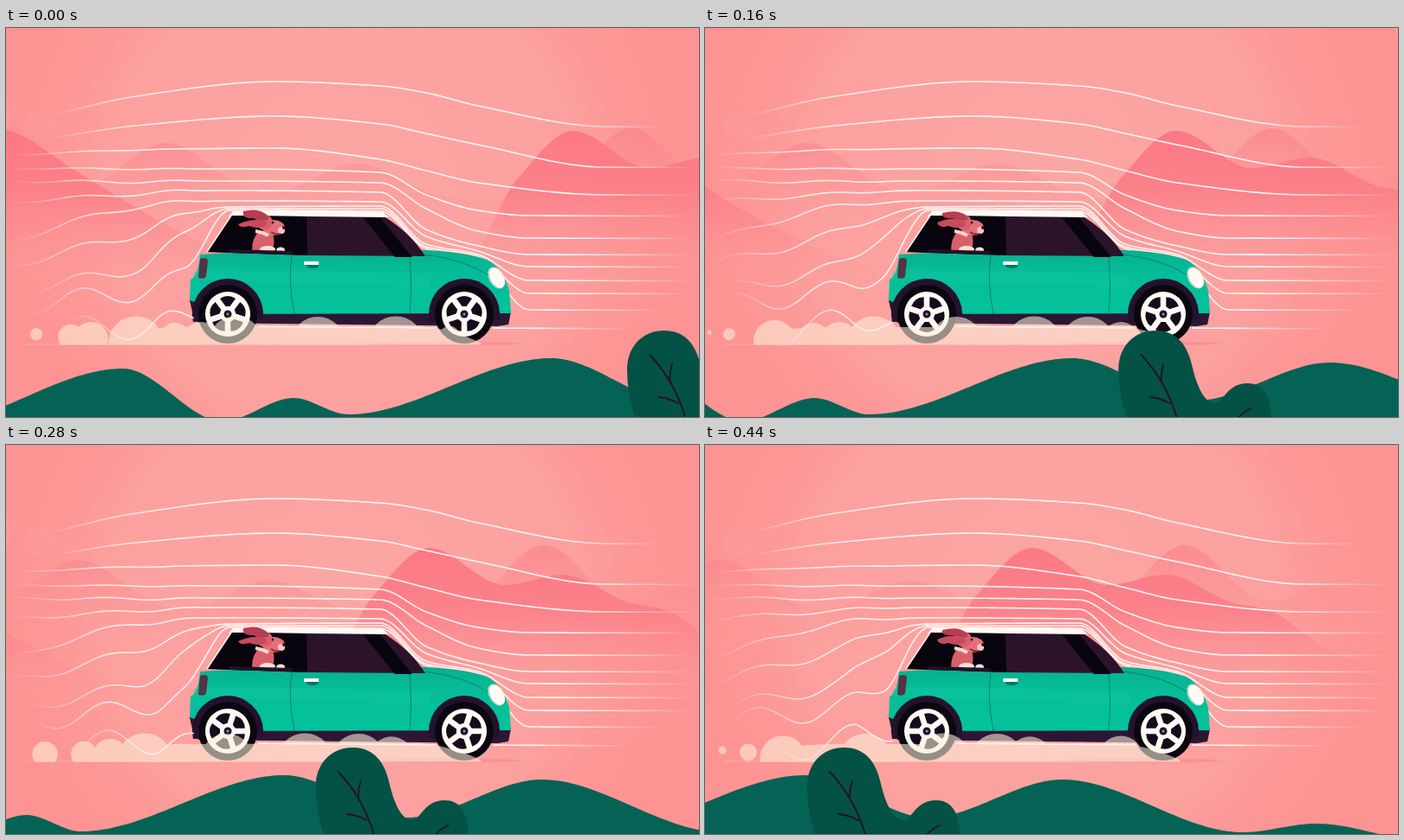
Recreate the animation shown at these times as an HTML page with a canvas. Size 800 px wide and 450 px high, loop 0.48 s.

```html
<!DOCTYPE html>
<html lang="en">
<head>
<meta charset="utf-8">
<title>Aerodynamic drive</title>
<style>
html, body { margin: 0; width: 100%; height: 100%; overflow: hidden; }
canvas { display: block; width: 800px; height: 450px; }
</style>
</head>
<body>
<canvas id="stage" width="800" height="450"></canvas>
<script>
const c = document.getElementById('stage').getContext('2d');
const LOOP = 480, STEP = 80, TAU = Math.PI * 2;
const clamp = (v, a = 0, b = 1) => Math.min(b, Math.max(a, v));

// Smooth interpolation y(x) through [x, y] points without overshoot
function curve(points) {
  const last = points.length - 1;
  const slope = i => (points[i + 1][1] - points[i][1]) / (points[i + 1][0] - points[i][0]);
  const tangents = points.map((p, i) => {
    if (i === 0 || i === last) return slope(i ? last - 1 : 0);
    const a = slope(i - 1), b = slope(i);
    return a * b > 0 ? 2 * a * b / (a + b) : 0;
  });
  return x => {
    x = clamp(x, points[0][0], points[last][0]);
    let i = 0;
    while (i < last - 1 && points[i + 1][0] < x) i++;
    const [x0, y0] = points[i], [x1, y1] = points[i + 1];
    const w = x1 - x0, u = (x - x0) / w, v = 1 - u;
    return v * v * (1 + 2 * u) * y0 + u * u * (3 - 2 * u) * y1 +
      w * u * v * (v * tangents[i] - u * tangents[i + 1]);
  };
}

// Sum of rounded peaks given as [x, height, width]
const peaks = (base, list) => x =>
  list.reduce((y, [at, height, width]) => y - height * Math.exp(-(((x - at) / width) ** 2)), base);

function gradient(x0, y0, x1, y1, ...stops) {
  const g = c.createLinearGradient(x0, y0, x1, y1);
  for (const [at, color] of stops) g.addColorStop(at, color);
  return g;
}

function fill(path, color) {
  c.fillStyle = color;
  c.fill(new Path2D(path));
}

function stroke(path, color, width = 1) {
  c.strokeStyle = color;
  c.lineWidth = width;
  c.stroke(new Path2D(path));
}

function ellipse(x, y, rx, ry, color, angle = 0) {
  c.fillStyle = color;
  c.beginPath();
  c.ellipse(x, y, rx, ry, angle, 0, TAU);
  c.fill();
}

function ridge(height, offset, color) {
  c.fillStyle = color;
  c.beginPath();
  c.moveTo(0, 450);
  for (let x = 0; x <= 800; x += 4) c.lineTo(x, height(x + offset));
  c.lineTo(800, 450);
  c.fill();
}

const paleHills = peaks(200, [[185, 67, 72], [405, 43, 70], [722, 84, 66], [887, 35, 60]]);
const redHills = curve([[-60, 112], [0, 118], [80, 165], [200, 235], [300, 275], [520, 285],
  [590, 175], [655, 119], [742, 162], [810, 150], [888, 183], [925, 190], [1003, 240], [1080, 265]]);
const greenHills = curve([[-35, 450], [135, 394], [250, 455], [332, 428], [395, 447], [630, 382],
  [772, 431], [927, 387], [1135, 448], [1220, 438], [1320, 456]]);

// Air streams: heights at the left, tail, roof start, roof end, hood, nose and right; wave size
const streams = [
  [102, 79, 62, 67, 75, 90, 114, 0],
  [128, 113, 102, 111, 122, 135, 161, 0],
  [147, 141, 139, 152, 165, 179, 193, .5],
  [162, 163, 163, 167, 193, 211, 217, .8],
  [177, 178, 177, 179, 209, 235, 243, 1.5],
  [201, 192, 188, 190, 233, 252, 262, 2],
  [246, 207, 200, 201, 241, 258, 276, 3],
  [274, 238, 207, 206, 250, 262, 292, 5],
  [302, 277, 209, 209, 253, 264, 307, 7],
  [320, 304, 211, 212, 255, 267, 326, 12]
].map(([left, tail, roof, roofEnd, hood, nose, right, wave], i) => {
  const high = i < 3;
  const from = i < 2 ? 48 : i > 7 ? 25 : 6, to = i % 9 ? 796 : 762;
  const points = [[from, left], [150, tail], [high ? 310 : 258, roof], [432, roofEnd],
    [485, hood], [545, nose], [high ? 690 : 604, right], [to, right + .5]];
  if (!high) points.splice(2, 0, [205, roof + (tail - roof) * wave * .065]);
  return { wave, from, to, y: curve(points) };
});
const underflow = { wave: 17, from: 70, to: 722, y: curve([[75, 352], [215, 338], [290, 345], [720, 348]]) };

function drawStream({ wave, y, from, to }, t, start = from, end = to) {
  c.strokeStyle = gradient(from, 0, to, 0, [0, '#fff0ec00'], [.13, '#fff0ecd8'], [.3, '#fff4f0'],
    [.82, '#fff4f0'], [1, '#fff0ec00']);
  c.lineWidth = 1.6;
  c.beginPath();
  for (let x = start; x <= end; x += 3) {
    const ripple = Math.cos(TAU * ((x - 143) / 110 + t / 320));
    c.lineTo(x, y(x) + wave * clamp((235 - x) / 60) * ripple);
  }
  c.stroke();
}

function drawSky(t) {
  c.fillStyle = '#fd9392';
  c.fillRect(0, 0, 800, 450);
  const glow = c.createRadialGradient(390, 190, 40, 390, 190, 430);
  glow.addColorStop(0, '#fba6a4');
  glow.addColorStop(.6, '#fca09e');
  glow.addColorStop(1, '#fd939200');
  c.fillStyle = glow;
  c.fillRect(0, 0, 800, 450);
  ellipse(38, 112, 18, 16, '#ff9fa655');
  ellipse(-4, 98, 14, 22, '#ff9fa644');
  ridge(paleHills, t * .42, gradient(0, 110, 0, 240, [0, '#fb838bcc'], [1, '#fc9a9a00']));
  ridge(redHills, t * .694, gradient(0, 115, 0, 300, [0, '#fb7884'], [.4, '#fb7d87e0'], [1, '#fc9a9a00']));
}

function drawDog(step) {
  fill('M284 257 Q284 243 292 235 L307 236 Q312 248 307 257Z', '#d9606b');
  ellipse(309, 231, 13, 9, '#e2717b');
  ellipse(299, 225, 9, 9, '#d9606b');
  const lift = step % 3 - 1;
  fill(`M303 218 Q293 ${208 + lift} 274 ${213 + lift} Q272 221 286 220 Q291 224 303 222Z`, '#b83d52');
  fill(`M301 224 Q286 ${218 - lift} 268 ${226 - lift} Q270 232 281 229 Q291 233 300 229Z`, '#c64b5c');
  stroke('M288 235 Q296 236 303 240', '#f6d5cd', 4);
  ellipse(318, 234, 4, 4, '#f3c7c2');
  ellipse(321, 231, 2, 2, '#25101e');
  ellipse(308, 225, 1.3, 1.6, '#25101e');
  stroke('M306 236 Q312 240 317 238', '#7e2238', 1.6);
  ellipse(302, 256, 9, 4, '#f8dfd4');
  ellipse(317, 257, 5, 3.4, '#f8dfd4');
}

function drawWheel(x, t) {
  c.fillStyle = '#24122c';
  c.beginPath();
  c.arc(x, 331, 41, Math.PI * .93, Math.PI * 2.05);
  c.fill();
  c.save();
  c.translate(x, 331);
  ellipse(0, 0, 34, 34, '#0b0710');
  ellipse(0, 0, 26, 26, '#fffaf4');
  c.rotate(TAU / 5 * t / 320);
  for (let i = 0; i < 5; i++) {
    fill('M-2.5 -9 L-9 -18 Q0 -24 9 -18 L2.5 -9Z', '#150b1b');
    c.rotate(TAU / 5);
  }
  ellipse(0, 0, 4.5, 4.5, '#21112a');
  ellipse(0, 0, 1.5, 1.5, '#9b8d91');
  c.restore();
}

function drawCar(t, step) {
  ellipse(500, 365, 96, 2.5, '#f6848d88');
  fill('M212 314 L222 341 L568 345 L580 343 L583 328 L560 310Z', '#2c1733');
  fill('M224 262 Q300 257 484 257 Q530 259 555 268 Q573 277 581 304 L583 330 L224 331 L212 316 L213 291 Q222 287 224 262Z',
    gradient(0, 258, 0, 332, [0, '#08b08f'], [.35, '#05bd98'], [1, '#02c39d']));
  fill('M216 283 L225 279 L490 284 V300 L216 291Z', '#13c9a355');
  fill('M212 315 L223 319 V341 L217 337Z', '#2c1733');
  fill('M257 218 L262 212 Q350 210 435 213 L442 219Z', '#fff9f4');
  fill('M260 217 L438 219 Q468 238 484 264 L347 263 L232 259Z', '#2b142b');
  fill('M260 217 L347 218 L348 263 L232 259Z', '#09050e');
  fill('M412 219 H432 L469 265 H449Z', '#09050e');
  drawDog(step);
  fill('M258 256 L330 258 V262 L257 260Z', '#251126');
  stroke('M260 217 L232 259', '#fff4ec', 1.5);
  stroke('M330 264 Q325 290 333 331 M466 265 Q469 300 466 331 M484 262 Q530 268 557 286', '#087f70');
  ellipse(354, 275, 7, 3, '#087364');
  stroke('M344 272 H361', '#fffaf4', 4);
  fill('M224 267 Q233 264 233 270 L231 287 Q230 291 222 289Z', '#503545');
  ellipse(566, 289, 8.5, 13.5, '#b9d8cd', -.5);
  ellipse(567, 289, 7.5, 12.5, '#fffaf4', -.5);
  drawWheel(256, t);
  drawWheel(529, t);
}

// Puffs at the start of the loop: x, radius
const puffs = [[35, 19], [75, 21], [98, 22], [150, 32], [195, 18], [225, 20], [265, 32],
  [360, 31], [450, 32], [512, 31], [550, 25], [655, 33]];

function drawSmoke(t) {
  const drift = t * .4375, tail = (t < 200 ? 150 : 265) - drift;
  c.fillStyle = '#fff0dc24';
  c.fillRect(22, 365, 200, 2);
  c.save();
  c.beginPath();
  c.rect(0, 300, 800, 66.5);
  c.clip();
  const cloud = new Path2D(`M${tail} 367 L${tail + 5} 350 Q${tail + 40} 344 215 346 L480 345 Q515 349 548 364 V367Z`);
  for (const [x0, size] of puffs) {
    const x = x0 - drift;
    const r = size * clamp((x + 10) / 120) * clamp((540 - x) / 75);
    if (r < 1) continue;
    const puff = new Path2D();
    puff.arc(x, 351 + r * .45, r, 0, TAU);
    cloud.addPath(puff);
  }
  c.fillStyle = '#fcefd994';
  c.fill(cloud);
  c.restore();
}

function drawForeground(t) {
  ridge(greenHills, t * 1.286, '#046355');
  c.save();
  c.translate(717 - t * 1.498, 0);
  fill('M12 460 Q0 425 0 396 C0 368 18 350 43 350 C68 350 80 368 85 391 C91 416 99 433 111 434 C121 434 125 411 149 411 C168 411 178 427 176 460Z', '#045145');
  c.lineCap = 'round';
  stroke('M26 378 Q55 408 68 453 M52 389 Q48 401 50 411 M36 427 Q48 428 59 434 M138 451 Q144 444 153 440', '#24112a', 1.8);
  c.restore();
}

function draw(now) {
  const step = Math.floor(now % LOOP / STEP), t = step * STEP;
  drawSky(t);
  for (const stream of streams) drawStream(stream, t);
  drawCar(t, step);
  drawSmoke(t);
  for (const [from, to] of [[70, 218], [290, 498], [562, 722]]) drawStream(underflow, t, from, to);
  drawForeground(t);
}

const start = performance.now();
function tick() {
  draw(performance.now() - start);
  requestAnimationFrame(tick);
}
tick();
</script>
</body>
</html>
```
